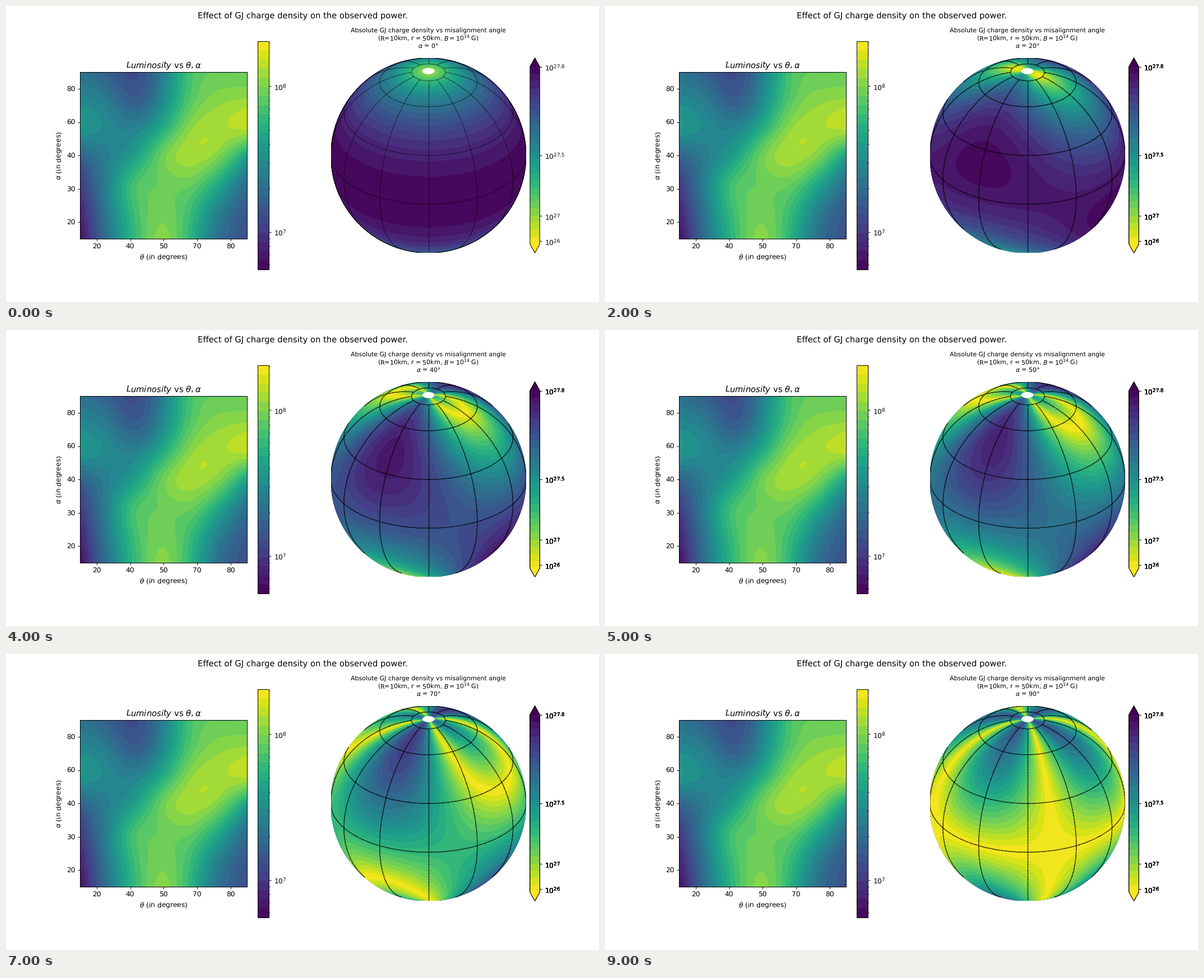
Animation of 1058 by 529 pixels, one loop 9.5 s. Source, as a matplotlib script:

```python
import numpy as np
import matplotlib.pyplot as plt
from matplotlib.animation import FuncAnimation
from matplotlib.patches import Circle, Ellipse

plt.rcParams["text.hinting"] = "none"

W, H = 1058, 529
FRAMES, STEP_MS = 19, 500
GRID_COPIES, BAR_COPIES = 3, 5  # overprints that thicken grid and colour bar
LEVELS = np.linspace(0, 1, 26)
TILT = np.radians(30)           # latitude at the centre of the globe

fig, (ax, box) = plt.subplots(1, 2, figsize=(12, 6), dpi=W / 12)
fig.suptitle("Effect of GJ charge density on the observed power.")


# ---------- luminosity map ----------
def spline_basis(x, knots):
    """Natural cubic spline weights of every knot at the points x."""
    n = len(knots)

    def cubic(a):
        return np.abs(a[:, None] - knots) ** 3

    def line(a):
        return np.column_stack([np.ones_like(a), a])

    system = np.block([[cubic(knots), line(knots)],
                       [line(knots).T, np.zeros((2, 2))]])
    return np.hstack([cubic(x), line(x)]) @ np.linalg.inv(system)[:, :n]


# brightness on a coarse grid, top row first
coarse = np.array([
    [.370, .290, .230, .430, .710, .755, .760],
    [.460, .400, .290, .480, .735, .825, .845],
    [.520, .465, .440, .615, .830, .875, .890],
    [.310, .430, .565, .780, .868, .800, .570],
    [.170, .450, .705, .765, .765, .590, .350],
    [.090, .420, .695, .785, .670, .430, .270],
    [.030, .380, .670, .815, .630, .360, .240],
])[::-1]
u = np.linspace(0, 1, 200)
basis = spline_basis(u, np.linspace(0, 1, 7))
lum = np.clip(basis @ coarse @ basis.T, 0.001, 0.999)

lum_map = ax.contourf(u, u, lum, LEVELS, cmap="viridis", vmin=0, vmax=1)
ax.set_aspect("equal")
ticks = [.1, .3, .5, .7, .9]
ax.set_xticks(ticks, ["20", "40", "50", "70", "80"])
ax.set_yticks(ticks, ["20", "30", "40", "60", "80"])
ax.set_xlabel(r"$\theta$ (in degrees)")
ax.set_ylabel(r"$\alpha$ (in degrees)")
ax.set_title(r"$Luminosity$ vs $\theta, \alpha$")


def lum_pos(value):
    return 0.164 + 0.6396 * (np.log10(value) - 7)


bar = fig.colorbar(lum_map, ax=ax)
bar.set_ticks([lum_pos(1e7), lum_pos(1e8)], labels=["$10^7$", "$10^8$"])
minor = [k * 1e6 for k in range(6, 10)] + [k * 1e7 for k in range(2, 10)] + [2e8]
bar.set_ticks([lum_pos(m) for m in minor], minor=True)

# ---------- globe ----------
place = box.get_position()
box.remove()
size = place.width * W / 1.07
left = place.x0 * W + 0.1       # keeps the clip edge on a whole pixel
bottom = (place.y0 + place.height / 2) * H - size / 2
globe = fig.add_axes([left / W, bottom / H, size / W, size / H])
globe.set(xlim=(-1, 1), ylim=(-1, 1))
globe.axis("off")


def project(lat, lon):
    """Orthographic x, y; the far side becomes nan."""
    x = np.cos(lat) * np.sin(lon)
    y = np.cos(TILT) * np.sin(lat) - np.sin(TILT) * np.cos(lat) * np.cos(lon)
    depth = np.sin(TILT) * np.sin(lat) + np.cos(TILT) * np.cos(lat) * np.cos(lon)
    seen = depth > -1e-9
    return np.where(seen, x, np.nan), np.where(seen, y, np.nan)


rim, turn = np.meshgrid(np.sin(np.linspace(0, np.pi / 2, 190)),
                        np.linspace(0, 2 * np.pi, 420))
gx, gy = rim * np.cos(turn), rim * np.sin(turn)
gz = np.sqrt(np.clip(1 - rim ** 2, 0, 1))
sin_lat = np.clip(np.cos(TILT) * gy + np.sin(TILT) * gz, -1, 1)
cos_lat = np.sqrt(1 - sin_lat ** 2)
lon = np.arctan2(gx, gz * np.cos(TILT) - gy * np.sin(TILT))
axial = 0.99 * cos_lat ** (2 / 3)
lobes = 0.74 * sin_lat * np.cos(2 * (lon + np.pi / 6))


def density(alpha):
    return np.abs(np.cos(alpha) * axial + np.sin(alpha) * lobes)


def draw_density(alpha):
    return globe.contourf(gx, gy, density(alpha), LEVELS, cmap="viridis_r",
                          vmin=0, vmax=1, extend="both", zorder=1)


hole = np.cos(np.radians(86.4))
globe.add_patch(Ellipse((0, np.cos(TILT)), 2 * hole, 2 * hole * np.sin(TILT),
                        fc="white", ec="none", zorder=1.5))
limb = globe.add_patch(Circle((0, 0), 1, fill=False, ec="black", lw=1))


def graticule():
    lines = []
    lats = np.radians(np.linspace(-80, 80, 641))
    lons = np.radians(np.linspace(-180, 180, 1441))
    paths = [project(lats, np.radians(m) + 0 * lats) for m in range(-150, 181, 30)]
    paths += [project(np.radians(p) + 0 * lons, lons) for p in (0, 30, 60, 80)]
    for x, y in paths:
        lines += globe.plot(x, y, color="black", lw=1, dashes=[1, 1], zorder=2)
    return lines


def density_bar(mappable):
    cax = fig.add_axes([(left + 1.02 * size) / W, bottom / H,
                        0.05 * size / W, size / H])
    cb = fig.colorbar(mappable, cax=cax)
    powers = [26, 27, 27.5, 27.8]
    cb.set_ticks([10 ** (p - 27.8) for p in powers],
                 labels=["$10^{%g}$" % p for p in powers])
    return cax


def caption(y, text):
    return fig.text((left + size / 2) / W, 1 - y / H, text, fontsize=9,
                    ha="center", va="baseline")


caption(46.5, "Absolute GJ charge density vs misalignment angle")
caption(61, "(R=10km, r = 50km, $B = 10^{14}$ G)")
angle = caption(75, "")

state = {"map": draw_density(0)}
grids = [graticule() for _ in range(GRID_COPIES)]
bars = [[density_bar(state["map"])] for _ in range(BAR_COPIES)]


def update(i):
    state["map"].remove()
    state["map"] = draw_density(np.radians(5 * i))
    limb.set_zorder(1.2 if i == 0 else 0.9)
    angle.set_text(r"$\alpha$ = %d°" % (5 * i))
    for layers in (grids, bars):
        for k, layer in enumerate(layers):
            for artist in layer:
                artist.set_visible(k <= i)
    return []


anim = FuncAnimation(fig, update, frames=FRAMES, interval=STEP_MS,
                     init_func=lambda: update(0), repeat=True, repeat_delay=0)
plt.show()
```
